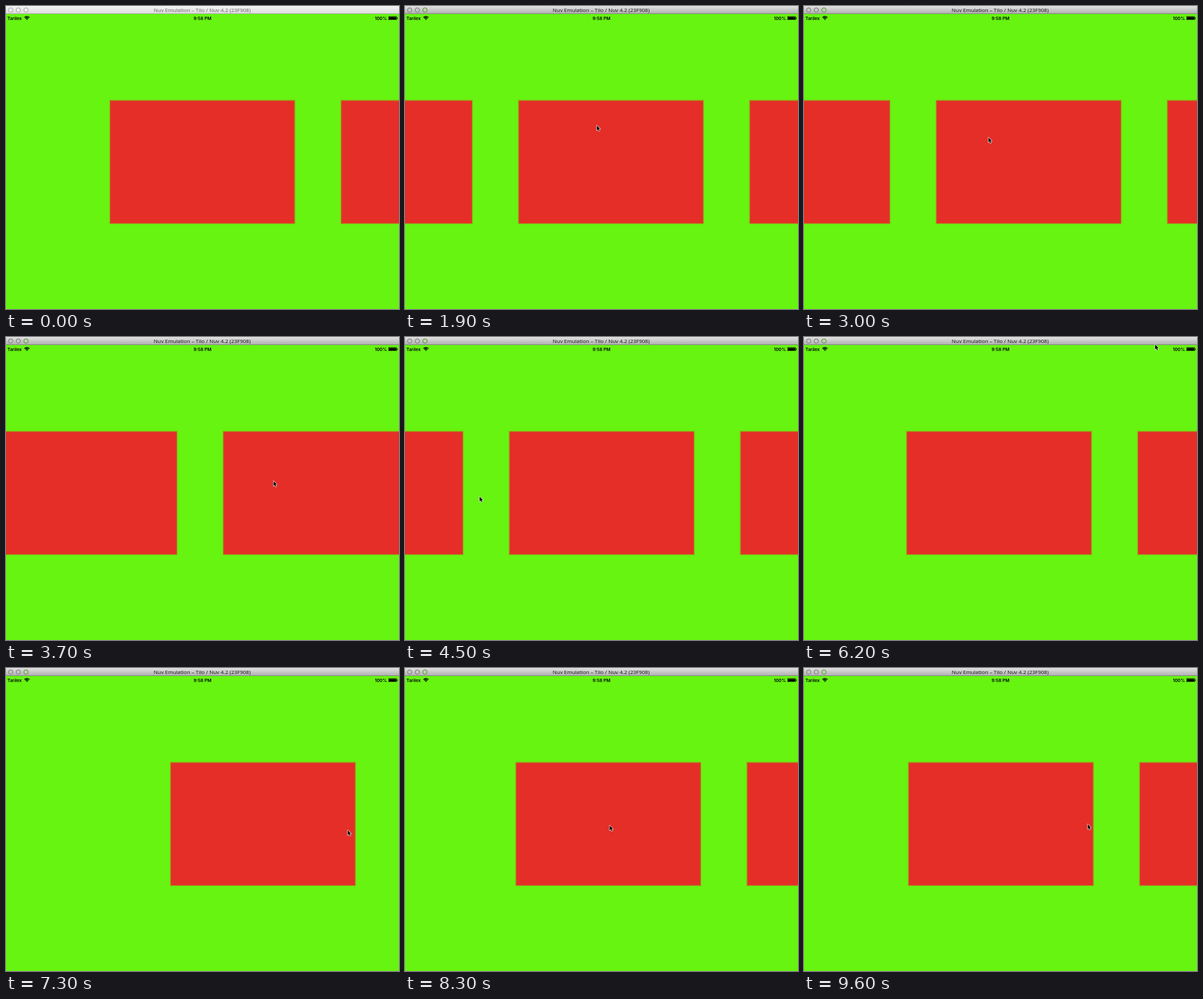
Animation, 590 px wide and 454 px high, one loop 9.7 s. Source, as an HTML page with a canvas:

```html
<!DOCTYPE html>
<html lang="en">
<head>
<meta charset="utf-8">
<title>Paging cards</title>
<style>
  html, body { margin: 0; width: 100%; height: 100%; overflow: hidden; background: #67f411; }
  canvas { display: block; }
</style>
</head>
<body>
<canvas id="stage" width="590" height="454"></canvas>
<script>
const ctx = document.getElementById('stage').getContext('2d');
const W = 590, H = 454, LOOP = 9700, TICK = 100;
const GREEN = '#67f411', RED = '#e42e27', EDGE = 'rgba(165, 145, 28, 0.25)';
const CARD = { left: 156, top: 141.5, width: 277.5, height: 184.5, pitch: 347, count: 7 };
const ACTIVE_FROM = 1300;
const TAU = 140;              // decay of every released scroll
const REFRESH = 17, TEAR = 50; // a jump this large within one refresh tears the picture

// Where the pointer comes to rest, and how far it swings sideways on the way there.
const stops = [
  { at: 100, x: 161, y: 310 },
  { at: 200, x: 290, y: 17 },
  { at: 500, x: 430, y: 125, swing: 130 },
  { at: 800, x: 430, y: 125 },
  { at: 1100, x: 394, y: 167 },
  { at: 1900, x: 288, y: 179, swing: 90 },
  { at: 3000, x: 277, y: 197, swing: 150 },
  { at: 4500, x: 112, y: 239, swing: 200 },
  { at: 5400, x: 448, y: 219 },
  { at: 6300, x: 530, y: 4 },
  { at: 7300, x: 513, y: 243, swing: -200 },
  { at: 7600, x: 513, y: 243 },
  { at: 8600, x: 426, y: 234, swing: -170 }
];

const lerp = (a, b, k) => a + (b - a) * k;
const clamp = k => Math.max(0, Math.min(1, k));
const smooth = k => k * k * (3 - 2 * k);
const decay = elapsed => Math.exp(-Math.max(0, elapsed) / TAU);

const flick = (t, at, pages) => pages * CARD.pitch * (1 - decay(t - at));

// Drags past the first card, holds, then springs back.
function pull(t, from, to, release, distance) {
  return -distance * smooth(clamp((t - from) / (to - from))) * decay(t - release);
}

function scrollAt(t) {
  return flick(t, 1455, 1) + flick(t, 2706, 1) + flick(t, 3600, 1)
    + flick(t, 4600, -1) + flick(t, 5376, -2)
    + pull(t, 6800, 7300, 7600, 91) + pull(t, 8200, 8600, 9000, 63);
}

function pointerAt(t) {
  if (t < stops[0].at) return null;
  const i = stops.findIndex(s => s.at > t);
  if (i < 0) return stops[stops.length - 1];
  const a = stops[i - 1], b = stops[i];
  const k = (t - a.at) / (b.at - a.at);
  return {
    x: lerp(a.x, b.x, smooth(k)) + (b.swing || 0) * Math.sin(Math.PI * k),
    y: lerp(a.y, b.y, smooth(k))
  };
}

function text(str, x, y, font, color, align = 'left') {
  ctx.font = font;
  ctx.fillStyle = color;
  ctx.textAlign = align;
  ctx.fillText(str, x, y);
}

function drawCards(scroll, from, to) {
  ctx.save();
  ctx.beginPath();
  ctx.rect(from, 0, to - from, H);
  ctx.clip();
  ctx.fillStyle = RED;
  ctx.strokeStyle = EDGE;
  ctx.lineWidth = 3;
  for (let i = 0; i < CARD.count; i++) {
    const box = [CARD.left - scroll + i * CARD.pitch, CARD.top, CARD.width, CARD.height];
    ctx.fillRect(...box);
    ctx.strokeRect(...box);
  }
  ctx.restore();
}

function drawTitleBar(active) {
  const shade = ctx.createLinearGradient(0, 0, 0, 11);
  shade.addColorStop(0, active ? '#e2e2e2' : '#f4f4f4');
  shade.addColorStop(1, active ? '#b2b2b2' : '#dcdcdc');
  ctx.fillStyle = shade;
  ctx.fillRect(0, 0, W, 11);
  ctx.fillStyle = active ? '#858585' : '#aaa';
  ctx.fillRect(0, 11, W, 1);

  for (let i = 0; i < 3; i++) {
    const green = active && i === 2;
    ctx.beginPath();
    ctx.arc(7 + i * 11.5, 6, 3.3, 0, Math.PI * 2);
    ctx.fillStyle = green ? '#b9d6a6' : active ? '#c6c6c6' : '#eee';
    ctx.fill();
    ctx.lineWidth = 0.9;
    ctx.strokeStyle = green ? '#587a45' : active ? '#707070' : '#999';
    ctx.stroke();
  }
  text('Nuv Emulation – Tilo / Nuv 4.2 (23F908)', 294.5, 9,
    '8px "Open Sans", sans-serif', active ? '#111' : '#666', 'center');
}

function drawStatusBar() {
  const font = '600 6.7px Inter, sans-serif';
  text('Tarilex', 2, 21, font, '#000');
  text('9:58 PM', 295, 21, font, '#000', 'center');
  text('100%', 572, 21, font, '#000', 'right');

  ctx.strokeStyle = ctx.fillStyle = '#000';
  ctx.lineWidth = 1.2;
  const fan = r => ctx.arc(31.5, 21, r, -Math.PI * 0.76, -Math.PI * 0.24);
  for (const r of [3.3, 5.4]) {
    ctx.beginPath();
    fan(r);
    ctx.stroke();
  }
  ctx.beginPath();
  ctx.moveTo(31.5, 21);
  fan(1.8);
  ctx.fill();

  ctx.lineWidth = 0.6;
  ctx.strokeRect(574.3, 15.8, 12.2, 4.9);
  ctx.fillRect(575, 16.4, 10.8, 3.7);
  ctx.fillRect(587, 17.3, 1, 2);
}

const arrow = new Path2D('M0 0V8L1.8 6.4L3.1 9.3L4.5 8.7L3.2 5.8L5.6 5.6Z');

function drawPointer({ x, y }) {
  ctx.save();
  ctx.translate(x, y);
  ctx.scale(0.92, 0.92);
  ctx.lineJoin = 'round';
  ctx.lineWidth = 1.2;
  ctx.strokeStyle = '#fff';
  ctx.stroke(arrow);
  ctx.fillStyle = '#000';
  ctx.fill(arrow);
  ctx.restore();
}

function draw(t) {
  ctx.fillStyle = GREEN;
  ctx.fillRect(0, 0, W, H);

  const scroll = scrollAt(t), late = scrollAt(t - REFRESH);
  const split = Math.abs(scroll - late) > TEAR ? 360 : W;
  drawCards(scroll, 0, split);
  drawCards(late, split, W);

  drawTitleBar(t >= ACTIVE_FROM);
  drawStatusBar();
  const pointer = pointerAt(t);
  if (pointer) drawPointer(pointer);
}

const start = performance.now();
function frame() {
  const t = (performance.now() - start) % LOOP;
  draw(Math.floor(t / TICK) * TICK);
  requestAnimationFrame(frame);
}
frame();
</script>
</body>
</html>
```
